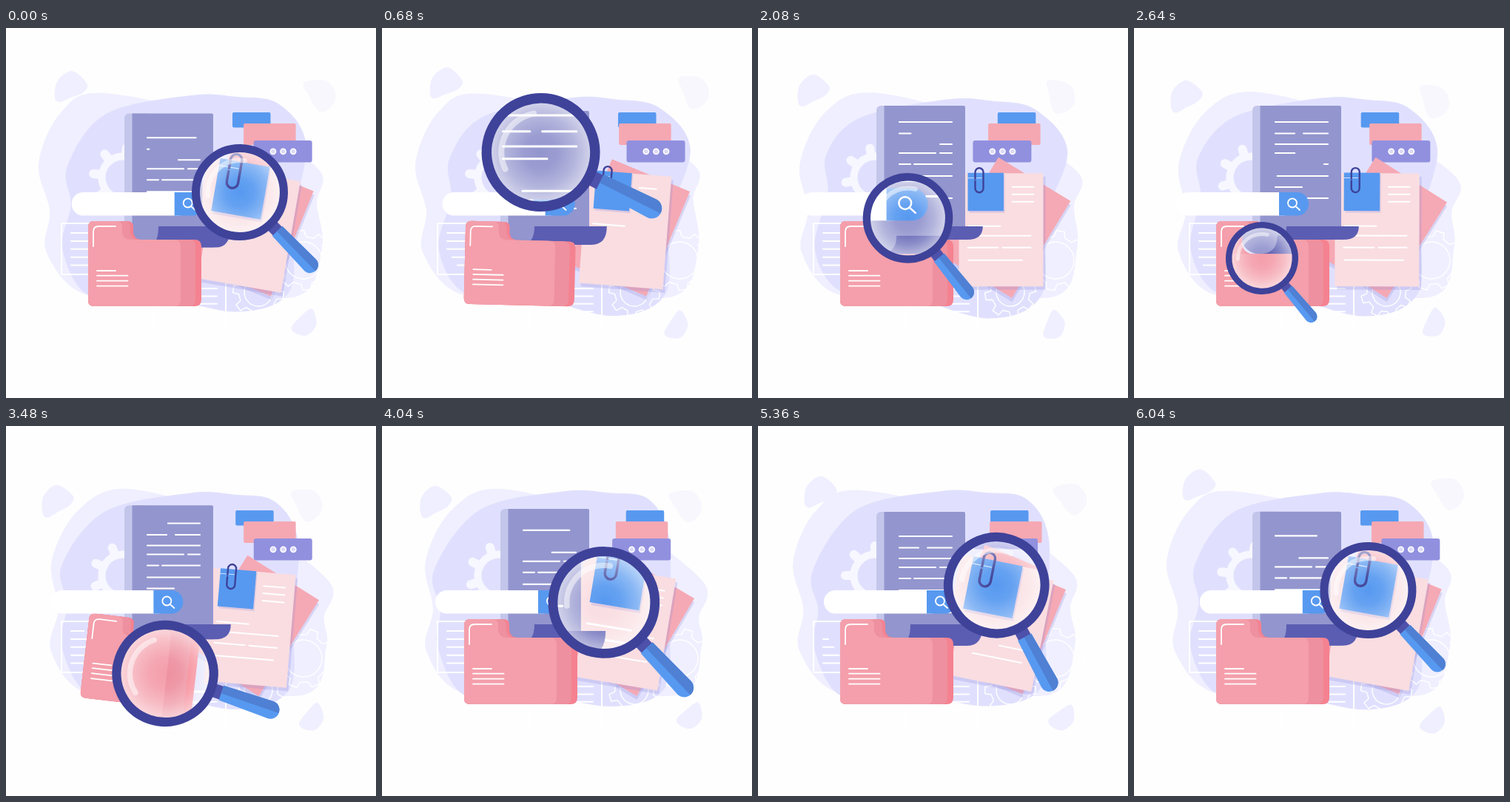
Recreate the animation shown at these times as an HTML page with a canvas. Size 500x500 px, loop 6080 ms.

```html
<!DOCTYPE html>
<html lang="en">
<head>
<meta charset="utf-8">
<title>Search illustration</title>
<style>
html, body { margin: 0; width: 100%; height: 100%; overflow: hidden; background: #fefefe; }
canvas { display: block; width: 500px; height: 500px; }
</style>
</head>
<body>
<canvas id="stage"></canvas>
<script>
const LOOP = 6080, HALF = LOOP / 2, THIRD = LOOP / 3, TAU = Math.PI * 2, RAD = Math.PI / 180;
const canvas = document.getElementById('stage');
const dpr = window.devicePixelRatio || 1;
canvas.width = canvas.height = 500 * dpr;
const c = canvas.getContext('2d');

const BLUE = '#5799f0', WHITE = '#fff', PAGE = '#9395ce', INK = '#3e4299';
const PALE = '#f0efff', LILAC = '#e0e0fe', SHADOW = 'rgba(150,145,215,.28)';

// Stops of the magnifier: time, x, y, radius, angle, vertical view shift
const STOPS = [
  [0, 316, 222, 65, 46, 0],
  [680, 214.6, 168, 80, 26.8, 8.5],
  [1600, 226, 208, 73, 52, 7],
  [2640, 173, 311, 49, 50, -21],
  [3480, 215, 334.5, 71.6, 19, 0],
  [3880, 290, 250, 75, 40, 2],
  [4760, 324, 210, 76, 68, 2]
];

// Blob outlines: x, y, then how far the point sways in x and y
const OUTER = [
  [152, 87, 17, -2], [87, 113, 12, 0], [53, 183, 9, 0], [65, 247, 6, 0], [58, 304, 3, 0],
  [111, 361, 0, 0], [240, 350, 0, 0], [398, 363, 6, 0], [430, 298, 3, 0], [425, 246, 5, 14],
  [429, 198, 7, 12], [320, 130, 0, 0]
];
const INNER = [
  [250, 92, 5, 5], [135, 117, 3, 5], [82, 184, 13, -14], [87, 237, 9, -15], [76, 298, 1, 0],
  [111, 360, 0, -5], [190, 358, 0, 0], [310, 385, 0, 8], [383, 357, 0, 5], [388, 260, 0, 0],
  [404, 158, 18, 9], [368, 104, 9, 7], [312, 94, 6, 5]
];

const mod = (a, n) => ((a % n) + n) % n;
const clamp = (v, lo, hi) => Math.max(lo, Math.min(hi, v));
const wave = (t, peak, period = LOOP) => Math.cos(TAU * (t - peak) / period);
// Like wave, but lingers at both ends
const linger = (t, peak, period) => Math.sin(Math.PI / 2 * wave(t, peak, period));
const bump = u => Math.sin(Math.PI * clamp(u, 0, 1)) ** 2;

// Periodic monotone cubic through one column of rows keyed by time
function track(t, rows, col) {
  const n = rows.length;
  const time = i => rows[mod(i, n)][0] + Math.floor(i / n) * LOOP;
  const val = i => rows[mod(i, n)][col];
  const rate = i => (val(i + 1) - val(i)) / (time(i + 1) - time(i));
  const slope = i => {
    const a = rate(i - 1), b = rate(i);
    return a * b <= 0 ? 0 : 2 * a * b / (a + b);
  };
  let i = n - 1;
  while (time(i) > t) i--;
  const h = time(i + 1) - time(i), u = (t - time(i)) / h, w = 1 - u;
  return val(i) * (1 + 2 * u) * w * w + h * slope(i) * u * w * w +
    val(i + 1) * u * u * (3 - 2 * u) - h * slope(i + 1) * u * u * w;
}

function smooth(pts, fill) {
  const n = pts.length, pt = i => pts[mod(i, n)];
  c.beginPath();
  c.moveTo(...pts[0]);
  for (let i = 0; i < n; i++) {
    const [p, a, b, q] = [pt(i - 1), pt(i), pt(i + 1), pt(i + 2)];
    c.bezierCurveTo(a[0] + (b[0] - p[0]) / 6, a[1] + (b[1] - p[1]) / 6,
      b[0] - (q[0] - a[0]) / 6, b[1] - (q[1] - a[1]) / 6, b[0], b[1]);
  }
  c.fillStyle = fill;
  c.fill();
}

const blob = (pts, sx, sy, fill) =>
  smooth(pts.map(([x, y, ax, ay]) => [x + ax * sx, y + ay * sy]), fill);

function at(x, y, deg, draw) {
  c.save();
  c.translate(x, y);
  c.rotate(deg * RAD);
  draw();
  c.restore();
}

function box(x, y, w, h, r, fill) {
  c.beginPath();
  c.roundRect(x, y, w, h, r);
  c.fillStyle = fill;
  c.fill();
}

function disc(x, y, r, fill) {
  c.beginPath();
  c.arc(x, y, r, 0, TAU);
  c.fillStyle = fill;
  c.fill();
}

function pen(color, width) {
  c.strokeStyle = color;
  c.lineWidth = width;
  c.lineCap = c.lineJoin = 'round';
}

// Strokes the part of each segment that lies between from and to
function rule(y, segs, from = -999, to = 999) {
  for (const [a, b] of segs) {
    const x0 = Math.max(a, from), x1 = Math.min(b, to);
    if (x1 <= x0) continue;
    c.beginPath();
    c.moveTo(x0, y);
    c.lineTo(x1, y);
    c.stroke();
  }
}

// A line that is wiped from the left until `end`, then written again
function typed(t, y, segs, end, speed) {
  const x0 = segs[0][0], len = segs[segs.length - 1][1] - x0;
  const u = mod(t - end, THIRD);
  const shown = clamp((u - 130) * speed, 0, len);
  const wiped = clamp((u - THIRD) * speed + len, 0, len);
  rule(y, segs, x0 + wiped, x0 + shown);
}

function gearLine(x, y, hole, deg) {
  const body = hole + 7.5, tip = hole + 15.5;
  at(x, y, deg, () => {
    c.beginPath();
    for (let i = 0; i < 8; i++) {
      for (const [d, r] of [[-13, body], [-8, tip], [8, tip], [13, body]]) {
        const a = (i * 45 + d) * RAD;
        c.lineTo(r * Math.cos(a), r * Math.sin(a));
      }
    }
    c.closePath();
    c.moveTo(hole, 0);
    c.arc(0, 0, hole, 0, TAU);
    c.stroke();
  });
}

function backdrop(t) {
  at(78.5 + 9.5 * wave(t, 170), 88 + 14 * wave(t, 3900), -4 + 4 * wave(t, 400), () =>
    smooth([[-18, -8], [2, -21], [22, -3], [15, 9], [-3, 16], [-16, 21], [-22, 14]], PALE));
  at(413 + 10 * wave(t, 5900), 98 + 11 * wave(t, 4000), 11 + 13 * wave(t, 1900), () =>
    smooth([[-23, -13], [-12, -20], [9, -21], [22, -6], [20, 10], [7, 21], [-3, 16], [-12, 3]], '#f7f7fd'));
  at(405 + 10.5 * wave(t, 4300), 398 + 6.5 * wave(t, 1400), -15 - 18 * wave(t, 1900), () =>
    smooth([[-17, 3], [-3, -9], [12, -18], [17, -9], [16, 6], [2, 17], [-13, 12]], PALE));

  blob(OUTER, wave(t, 3200), wave(t, 3900), PALE);
  blob(INNER, wave(t, 1450), wave(t, 1700), LILAC);

  const turn = -6.5 + 14.5 * wave(t, 350);
  at(158, 202, turn, () => {
    pen('#f7f7ff', 10);
    c.beginPath();
    c.arc(0, 0, 28.5, 0, TAU);
    c.stroke();
    c.lineWidth = 12;
    for (let i = 0; i < 8; i++) {
      c.rotate(TAU / 8);
      rule(0, [[32, 40]]);
    }
  });

  pen(WHITE, 2);
  c.strokeRect(75, 264, 110, 69);
  for (let i = 0; i < 5; i++) typed(t, 277 + i * 10.9, [[88, 133]], 1180 - i * 60, 0.12);
  c.strokeRect(200, 300, 97, 110);
  for (let i = 0; i < 4; i++) rule(352 + i * 10.4, [[240, 285]]);
  pen(WHITE, 1.4);
  gearLine(402, 314, 25, -turn);
  gearLine(341, 357, 19, turn);
}

function chat(t) {
  const slide = linger(t, 230, HALF);
  box(319 + 13 * linger(t, 1440, HALF), 114, 51.5, 20.5, 2, BLUE);
  box(316 + 5.2 * slide, 129, 70.5, 29, 2, '#f5a8b2');
  const x = 312 + 23 * slide;
  box(x, 152, 79, 29.5, 3, '#9190df');
  for (let i = 0; i < 3; i++) {
    disc(x + 26.3 + i * 13.6, 166.8, 4.4, WHITE);
    disc(x + 26.3 + i * 13.6, 166.8, 2.8, '#dcdaf8');
  }
}

function sheet(fill) {
  box(-54, -72, 114, 153, 0, SHADOW);
  box(-57, -76.5, 114, 153, 0, fill);
}

function papers(t) {
  at(334, 269.8, 27.2 + 5 * linger(t, 3000), () => sheet('#f5a9b4'));
  at(328.5, 272.7, 5.7 + 5.7 * linger(t, 5100), () => {
    sheet('#f9dde1');
    pen(WHITE, 2);
    const short = [[15, 44]];
    const lines = [
      [-5, [[-44, -1]]], [-58, short], [8, [[-45, 40]]], [-48, short],
      [24, [[-45, -4], [2, 40]]], [-38, short], [41, [[-44, 36]]]
    ];
    lines.forEach(([y, segs], i) => {
      const x0 = segs[0][0];
      rule(y, segs, x0 + Math.max(0, (t - 4950 - i * 60) * 0.25), x0 + (t - 350 - i * 240) * 0.25);
    });
    box(-43, -75, 48, 52, 0, SHADOW);
    box(-45, -77, 48.5, 51.5, 0, BLUE);
    pen('#cfe2ff', 1);
    rule(-70, [[-45, -26]]);
    pen(INK, 2.4);
    c.beginPath();
    c.moveTo(-35, -69);
    c.lineTo(-35, -78);
    c.arc(-29.5, -78, 5.5, Math.PI, 0);
    c.lineTo(-24, -56);
    c.arc(-29.5, -56, 5.5, 0, Math.PI);
    c.lineTo(-35, -66);
    c.stroke();
  });
}

function page(t) {
  const s = 11 + 11 * linger(t, 5400);
  const top = 105 + s / 2, end = 286 + s / 2;
  box(160, top, 30, end - top - 14, [6, 0, 0, 0], '#c3c6eb');
  box(170.5, top, 109.5, end - top, [0, 2, 0, 18], PAGE);
  c.beginPath();
  c.moveTo(206, 268);
  c.lineTo(303.8, 268);
  c.quadraticCurveTo(303.8, end, 283, end);
  c.lineTo(188, end);
  c.quadraticCurveTo(206, end, 206, 268);
  c.fillStyle = '#5b5db2';
  c.fill();

  pen(WHITE, 2.2);
  const full = [[191, 262]];
  const lines = [
    [127, full], [142.5, [[191, 217], [229, 262]]], [157, full],
    [169, [[191, 240], [246, 262]]], [184, [[191, 206], [211, 262]]],
    [200, full], [215, [[191, 227]]], [230, full]
  ];
  lines.forEach(([y, segs], i) => typed(t, y + s, segs, 1630 + i * 258, 0.245));
}

function searchBar(t) {
  const x = 16 + 16 * linger(t, 5600);
  box(57 + x, 222, 160, 31.5, 15.7, WHITE);
  box(196 + x, 222, 40, 31.5, [0, 15.7, 15.7, 0], BLUE);
  pen(WHITE, 1.8);
  c.beginPath();
  c.arc(214 + x, 236.5, 6, 0, TAU);
  c.moveTo(218.5 + x, 241);
  c.lineTo(224 + x, 246);
  c.stroke();
}

function folderShape(right, tab, fill) {
  c.beginPath();
  c.moveTo(-76, -49);
  c.quadraticCurveTo(-76, -57, -68, -57);
  c.lineTo(tab - 8, -57);
  c.quadraticCurveTo(tab, -57, tab, -49);
  c.lineTo(tab, -42);
  c.quadraticCurveTo(tab + 1, -32, tab + 12, -32);
  c.lineTo(right - 9, -32);
  c.quadraticCurveTo(right, -32, right, -23);
  c.lineTo(right, 49);
  c.quadraticCurveTo(right, 58, right - 9, 58);
  c.lineTo(-68, 58);
  c.quadraticCurveTo(-76, 58, -76, 50);
  c.fillStyle = fill;
  c.fill();
}

function folder(t) {
  const u = mod(t, HALF), tilt = bump(u / 800);
  at(187 - 5 * tilt, 318, 6.8 * tilt, () => {
    const size = 1 - 0.025 * bump((u - 440) / 480);
    c.scale(size, size);
    folderShape(77, -15, '#f58290');
    folderShape(69, -19, '#ee909f');
    folderShape(49, -30, '#f49fab');
    pen(WHITE, 1.8);
    c.beginPath();
    c.moveTo(-69, -23);
    c.lineTo(-69, -43);
    c.quadraticCurveTo(-69, -50, -62, -50);
    c.lineTo(-39, -50);
    c.stroke();
    rule(10, [[-64, -39]]);
    for (let i = 0; i < 3; i++) rule(16.7 + i * 7, [[-64, -22.5]]);
  });
}

function scene(t) {
  backdrop(t);
  chat(t);
  papers(t);
  page(t);
  folder(t);
  searchBar(t);
}

function handle() {
  box(0.9, -0.13, 0.35, 0.26, 0.02, '#4e51aa');
  c.beginPath();
  c.moveTo(1.12, -0.145);
  c.lineTo(2.1, -0.17);
  c.arc(2.1, 0, 0.17, -Math.PI / 2, Math.PI / 2);
  c.lineTo(1.12, 0.145);
  c.closePath();
  c.fillStyle = BLUE;
  c.fill();
  c.clip();
  box(1, -0.3, 1.4, 0.31, 0, '#4f80d3');
}

function lens(t) {
  const [x, y, r, turn, dy] = [1, 2, 3, 4, 5].map(col => track(t, STOPS, col));
  const dx = (318 - x) * 0.125, glass = r * 0.84;

  at(x, y, turn, () => {
    c.scale(r, r);
    handle();
  });

  c.save();
  c.beginPath();
  c.arc(x, y, glass, 0, TAU);
  c.clip();
  c.fillStyle = '#fefefe';
  c.fill();
  c.save();
  c.translate(x, y);
  c.scale(1.4, 1.4);
  c.translate(-x - dx, -y - dy);
  scene(t);
  c.restore();
  const shade = c.createRadialGradient(x, y, 0, x, y, glass);
  shade.addColorStop(0, 'rgba(255,255,255,0)');
  shade.addColorStop(0.35, 'rgba(255,255,255,.08)');
  shade.addColorStop(0.7, 'rgba(255,255,255,.3)');
  shade.addColorStop(1, 'rgba(255,255,255,.58)');
  c.fillStyle = shade;
  c.fillRect(x - r, y - r, 2 * r, 2 * r);
  c.restore();

  at(x, y, turn, () => {
    pen('rgba(255,255,255,.5)', r * 0.1);
    c.beginPath();
    c.arc(0, 0, r * 0.665, 128 * RAD, 233 * RAD);
    c.stroke();
    pen(INK, r * 0.17);
    c.beginPath();
    c.arc(0, 0, r * 0.915, 0, TAU);
    c.stroke();
  });
}

function frame(now) {
  const t = mod(now, LOOP);
  c.setTransform(dpr, 0, 0, dpr, 0, 0);
  c.fillStyle = '#fefefe';
  c.fillRect(0, 0, 500, 500);
  scene(t);
  lens(t);
}

const start = performance.now();
function tick() {
  frame(performance.now() - start);
  requestAnimationFrame(tick);
}
tick();
</script>
</body>
</html>
```
